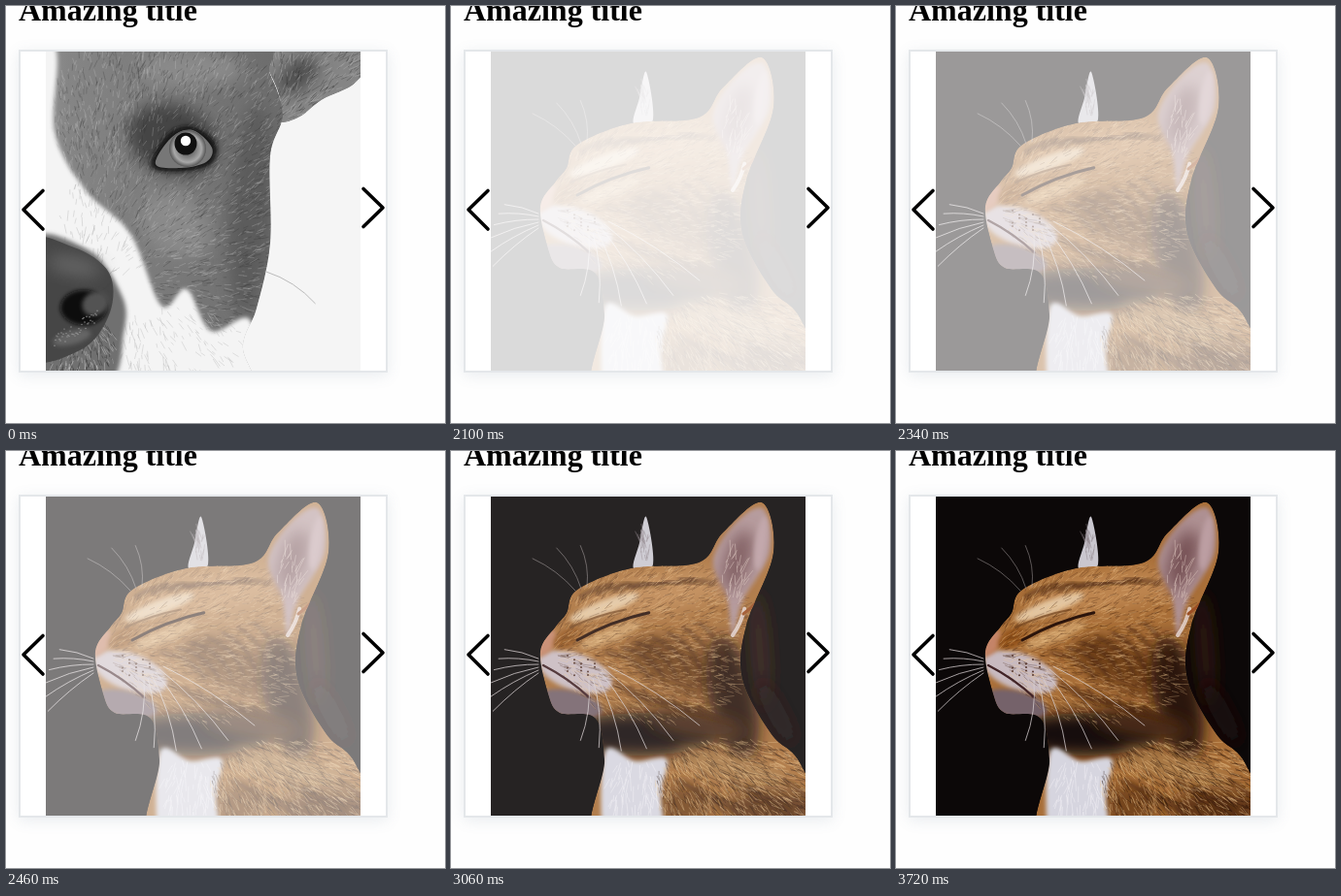
Recreate the animation shown at these times as an HTML page. Size 452 by 430 pixels, loop 5100 ms.

```html
<!DOCTYPE html>
<html lang="en">
<head>
<meta charset="utf-8">
<title>Fading slides</title>
<style>
html, body { margin: 0; width: 100%; height: 100%; overflow: hidden; background: #fefefe; }
svg { position: absolute; left: 0; top: 0; display: block; }
h1 { position: absolute; left: 13px; top: -14px; margin: 0; font: bold 32px/36px "Liberation Serif", serif; white-space: nowrap; }
.card { position: absolute; left: 13px; top: 45px; width: 376px; height: 329px; border: 2px solid #e4e7ea; background: #fff; box-shadow: 0 3px 14px rgba(90, 115, 140, .13); }
</style>
</head>
<body>
<h1>Amazing title</h1>
<div class="card"></div>
<svg width="452" height="430" viewBox="0 0 452 430">
  <defs>
    <clipPath id="photo"><rect x="41" y="47" width="324" height="329"/></clipPath>
    <filter id="soft" x="-60%" y="-60%" width="220%" height="220%"><feGaussianBlur stdDeviation="8"/></filter>
    <filter id="edge" x="-30%" y="-30%" width="160%" height="160%"><feGaussianBlur stdDeviation="2"/></filter>
    <radialGradient id="iris"><stop offset=".3" stop-color="#666"/><stop offset=".75" stop-color="#a8a8a8"/><stop offset="1" stop-color="#555"/></radialGradient>
    <linearGradient id="coat"><stop offset="0" stop-color="#b4b4b4"/><stop offset=".3" stop-color="#858585"/><stop offset="1" stop-color="#6c6c6c"/></linearGradient>
  </defs>
  <g clip-path="url(#photo)"><g id="dog"/><g id="cat"/></g>
  <g fill="none" stroke="#000" stroke-width="3.6" stroke-linecap="round" stroke-linejoin="round">
    <path d="M38 190.500L18 210L38 230"/>
    <path d="M368 188.500L388 208L368 227.500"/>
  </g>
</svg>
<script>
const NS = 'http://www.w3.org/2000/svg';
const dog = document.getElementById('dog'), cat = document.getElementById('cat');
const SOFT = 'url(#soft)', EDGE = 'url(#edge)';

function add(parent, tag, attrs) {
  const el = document.createElementNS(NS, tag);
  for (const k in attrs) el.setAttribute(k, attrs[k]);
  return parent.appendChild(el);
}

// Smooth closed curve through a few "x,y" points
function curve(text) {
  const p = text.split(' ').map(s => s.split(',').map(Number)), n = p.length;
  return 'M' + p[0] + p.map((b, i) => {
    const a = p[(i + n - 1) % n], c = p[(i + 1) % n], e = p[(i + 2) % n];
    return `C${b.map((v, k) => v + (c[k] - a[k]) / 6)} ${c.map((v, k) => v - (e[k] - b[k]) / 6)} ${c}`;
  }).join('');
}

const shape = (g, pts, fill, filter = 'none') => add(g, 'path', { d: curve(pts), fill, filter });
const disc = (g, cx, cy, r, fill) => add(g, 'circle', { cx, cy, r, fill });
const blob = (g, x, y, rx, ry, turn, fill, filter = SOFT) =>
  add(g, 'ellipse', { rx, ry, fill, filter, transform: `translate(${x} ${y}) rotate(${turn})` });

// Line of given direction and length, bowed sideways
function hair(g, x, y, deg, len, bow, stroke, width = 1, opacity = 1) {
  const a = deg * Math.PI / 180, c = Math.cos(a), s = Math.sin(a);
  return add(g, 'path', {
    d: `M${x} ${y}q${len / 2 * c - bow * s} ${len / 2 * s + bow * c} ${len * c} ${len * s}`,
    fill: 'none', stroke, 'stroke-width': width, 'stroke-linecap': 'round', opacity });
}

function clipped(parent, id, pts, fill) {
  add(add(document.querySelector('defs'), 'clipPath', { id }), 'path', { d: curve(pts) });
  const g = add(parent, 'g', { 'clip-path': `url(#${id})` });
  shape(g, pts, fill);
  return g;
}

let seed = 7;
const rnd = () => (seed = (seed * 16807) % 2147483647) / 2147483647;

// Hairs scattered over an ellipse, pointing away from a root
function fur(g, count, x, y, rx, ry, root, len, stroke, opacity) {
  let d = '';
  for (let i = 0; i < count; i++) {
    const r = Math.sqrt(rnd()), a = rnd() * 2 * Math.PI;
    const px = x + rx * r * Math.cos(a), py = y + ry * r * Math.sin(a);
    const way = Math.atan2(py - root[1], px - root[0]) + (rnd() - .5) * .8, l = len * (.4 + rnd());
    d += `M${px.toFixed(1)} ${py.toFixed(1)}l${(l * Math.cos(way)).toFixed(1)} ${(l * Math.sin(way)).toFixed(1)}`;
  }
  add(g, 'path', { d, fill: 'none', stroke, 'stroke-width': .9, opacity });
}

// Light and dark hairs together
function coat(g, count, x, y, rx, ry, root, len, light, dark, opacity) {
  for (const tone of [dark, light]) fur(g, count, x, y, rx, ry, root, len, tone, opacity);
}

function drawDog() {
  const nose = [80, 300];
  add(dog, 'rect', { x: 41, y: 47, width: 324, height: 329, fill: '#f5f5f5' });

  const ear = clipped(dog, 'ear', '254,40 270,66 282,95 282,119 303,114 325,97 361,78 380,40', '#858585');
  blob(ear, 300, 72, 26, 15, -40, '#505050');
  coat(ear, 220, 310, 80, 60, 45, [270, 130], 8, '#c8c8c8', '#222', .3);

  const head = clipped(dog, 'head', '0,0 250,30 272,70 285,112 272,155 272,245 258,312 244,350 243,420 0,420', 'url(#coat)');
  blob(head, 172, 138, 48, 36, 20, '#454545');
  blob(head, 252, 210, 22, 110, 4, '#5c5c5c');
  blob(head, 175, 225, 40, 30, 40, '#8a8a8a');
  blob(head, 190, 65, 55, 18, 0, '#8a8a8a');
  coat(head, 1500, 165, 180, 140, 165, nose, 7, '#d0d0d0', '#2b2b2b', .27);
  shape(head, '0,20 50,40 50,130 82,190 128,235 160,309 186,292 211,335 252,325 250,420 0,420', '#f4f4f4', EDGE);
  fur(head, 170, 110, 220, 55, 60, nose, 8, '#999', .3);
  fur(head, 140, 175, 345, 65, 35, [130, 250], 8, '#bbb', .45);

  shape(dog, '20,245 85,252 120,300 121,338 104,390 20,390', '#707070', EDGE);
  coat(dog, 130, 75, 350, 38, 32, nose, 7, '#ddd', '#222', .4);
  shape(dog, '20,246 70,249 106,275 107,316 78,354 20,360', '#464646');
  blob(dog, 70, 268, 28, 10, 12, '#646464');
  blob(dog, 80, 311, 24, 18, 0, '#111', EDGE);
  blob(dog, 92, 307, 14, 12, -30, '#525252', EDGE);
  blob(dog, 68, 342, 20, 7, -15, '#656565', EDGE);
  for (let i = 0; i < 45; i++) disc(dog, 50 + i, 353 - i * .6 - rnd() * 14, .7, '#999');

  shape(dog, '150,166 165,134 190,124 215,140 212,162 185,170', '#161616', EDGE);
  shape(dog, '154,163 170,136 192,128 212,146 206,161 180,167', '#777');
  disc(dog, 187, 147, 19, 'url(#iris)');
  disc(dog, 185, 142, 11.5, '#101010');
  disc(dog, 185, 139, 5.2, '#fff');
  hair(dog, 268, 274, 33, 60, -8, '#bbb');
}

function drawCat() {
  const nose = [92, 212], throat = [185, 250];
  add(cat, 'rect', { x: 41, y: 47, width: 324, height: 329, fill: '#0c0808' });
  blob(cat, 318, 205, 10, 60, -4, '#2a130c');
  blob(cat, 335, 270, 9, 38, -28, '#1f110d');
  shape(cat, '188,121 194,95 201,68 208,117', '#cac7cf');
  fur(cat, 30, 199, 100, 5, 16, [198, 140], 9, '#8c8188', .5);

  const body = clipped(cat, 'body', '92,207 107,182 119,167 130,143 185,121 255,115 280,84 320,53 332,105 304,180 300,235 330,292 361,325 390,420 160,420 158,318 148,275 112,270 100,250', '#a96f38');
  blob(body, 215, 145, 80, 20, -8, '#bd8550');
  blob(body, 232, 222, 52, 24, 25, '#74451f');
  blob(body, 290, 255, 24, 65, -12, '#2c160e');
  blob(body, 195, 292, 80, 22, 0, '#150c0a');
  blob(body, 255, 283, 50, 13, 8, '#4a2b18');
  blob(body, 290, 328, 58, 13, 15, '#a87947');
  blob(body, 240, 365, 28, 22, 0, '#74451f');
  blob(body, 330, 368, 50, 18, 0, '#5e3517');

  blob(body, 128, 228, 40, 19, 20, '#c8bac0', EDGE);
  blob(body, 122, 261, 34, 14, 12, '#75626a', EDGE);
  blob(body, 98, 198, 8, 15, 30, '#c48468', EDGE);
  blob(body, 120, 193, 16, 9, -30, '#94551f', EDGE);
  blob(body, 158, 161, 38, 7, -20, '#e2c5a0', EDGE);
  blob(body, 164, 190, 34, 7, -22, '#c89760', EDGE);
  shape(body, '158,312 190,320 222,318 216,355 218,420 162,420', '#d6d5df', EDGE);

  // Tabby bands along the brow, cheek and back
  for (let i = 0; i < 7; i++) {
    const band = (...at) => hair(body, ...at, '#482510', 4.5, .6).setAttribute('filter', EDGE);
    band(134 + 17 * i, 150 - 3 * i, -22 + 5 * i, 34, -3);
    band(160 + 16 * i, 208 - 5 * i, 30 + 5 * i, 52, -12);
    band(170 + 14 * i, 240 + 4 * i, 25, 38, 6);
    band(235 + 18 * i, 340 + 8 * (i % 3), 40, 34, -5);
  }
  coat(body, 950, 210, 195, 105, 85, nose, 8, '#f0c890', '#3f1f0c', .3);
  coat(body, 480, 290, 345, 80, 50, throat, 10, '#eac48e', '#241107', .38);
  fur(body, 80, 190, 345, 28, 30, throat, 12, '#f4f2f7', .5);

  hair(body, 130, 195, -21, 79, -6, '#2b140b', 3);
  hair(body, 123, 182, -18, 60, -4, '#71431f', 2, .7);
  hair(body, 95, 221, 35, 58, -4, '#422427', 2.4);
  for (let i = 0; i < 14; i++) disc(body, 120 + i % 5 * 7, 211 + i * 1.3 + i % 3 * 3, 1, '#5a3a30');

  shape(body, '270,112 295,72 322,60 328,105 300,155 290,190 284,150', '#ae9092', EDGE);
  blob(body, 295, 113, 13, 33, 18, '#755052');
  blob(body, 319, 95, 6, 28, 8, '#bc9ea2', EDGE);
  fur(body, 35, 290, 135, 12, 28, [275, 190], 13, '#e1cac1', .5);
  hair(body, 290, 190, -66, 30, 3, '#eadbd9', 4, .8);
  hair(body, 301, 168, -45, 34, 2, '#9c5025', 3);

  // Whiskers: left fan, cheek fan, brow
  for (let i = 0; i < 6; i++) {
    hair(cat, 90, 214 + 3 * i, 195 - 11 * i, 36 + 5 * i, 3, '#d8d0d2', 1, .75);
    hair(cat, 142 + 4 * i, 237 - 3 * i, 98 - 13 * i, 62 + 10 * i, -7, '#d8d0d2', 1, .75);
    if (i < 3) hair(cat, 128 + 6 * i, 144 - 2 * i, 217 + 22 * i, 55 - 6 * i, 6, '#a29a9b', .9, .6);
  }
}

const LOOP = 5100, SWAP = 1920, FADE_FROM = 2100, FADE_TO = 3720, STEP = 60;

// CSS "ease": cubic-bezier(.25, .1, .25, 1)
function ease(x) {
  const bez = (a, b, u) => 3 * a * u * (1 - u) ** 2 + 3 * b * u * u * (1 - u) + u ** 3;
  let lo = 0, hi = 1;
  for (let i = 0; i < 24; i++) {
    const mid = (lo + hi) / 2;
    if (bez(.25, .25, mid) < x) lo = mid; else hi = mid;
  }
  return bez(.1, 1, lo);
}

function catOpacity(t) {
  if (t < FADE_FROM) return .016;
  if (t >= FADE_TO) return 1;
  return ease((Math.floor(t / STEP) * STEP - 1840) / 2000);
}

function render(t) {
  const swapped = t >= SWAP;
  dog.setAttribute('visibility', swapped ? 'hidden' : 'visible');
  cat.setAttribute('visibility', swapped ? 'visible' : 'hidden');
  cat.setAttribute('opacity', catOpacity(t).toFixed(4));
}

drawDog();
drawCat();
const begin = performance.now();
function tick() {
  render((performance.now() - begin) % LOOP);
  requestAnimationFrame(tick);
}
tick();
</script>
</body>
</html>
```
